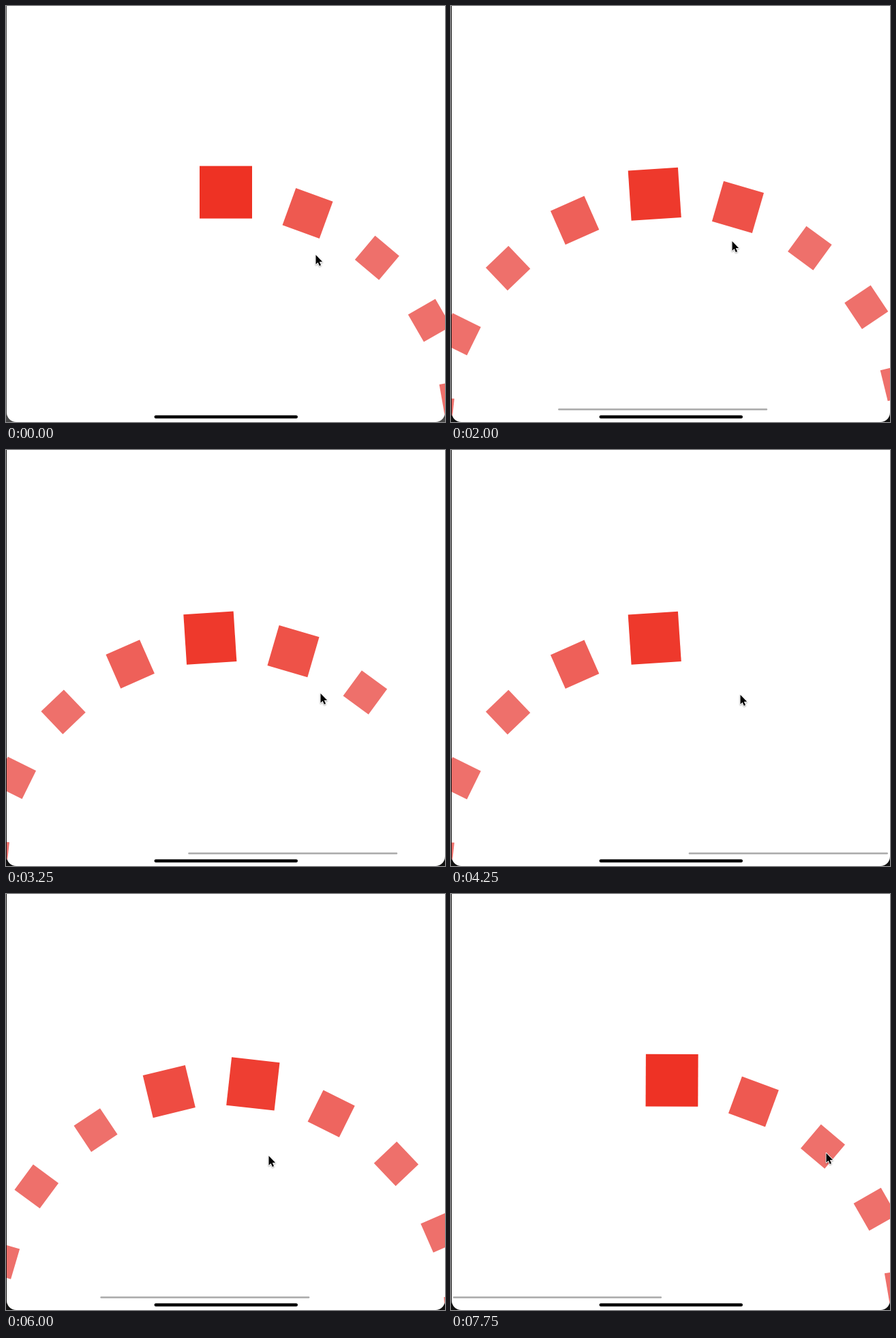
Write an HTML page with a canvas that moves like this. It is 644 px wide and 610 px high and loops after 8 s.

```html
<!DOCTYPE html>
<html>
<head>
<meta charset="utf-8">
<style>
  html, body { margin: 0; width: 100%; height: 100%; overflow: hidden; background: #fff; }
  canvas { display: block; }
</style>
</head>
<body>
<canvas id="stage" width="644" height="610"></canvas>
<script>
const ctx = document.getElementById('stage').getContext('2d');
const LOOP = 8000, STEP = 250;
const COUNT = 10, PITCH = 20, MAX = (COUNT - 1) * PITCH;
const SIZE = 77, RADIUS = 322, CX = 322.5, CY = 633.6;
const PX_PER_DEG = SIZE / PITCH;

// [time, scroll angle in degrees]
const scrollKeys = [[0, 0], [500, 7], [2000, 83.8], [3250, 143.7], [4250, 183.8],
  [5000, 150], [6000, 73.6], [7000, 3], [7250, -4], [7500, -1.6], [7750, -0.25]];
// [time, x, y] of the pointer tip
const pointerKeys = [[0, 454, 365], [2000, 412, 345], [3250, 461, 357], [4250, 424, 359],
  [5000, 403, 389], [6000, 385, 384], [7750, 550, 380]];

// Monotone cubic interpolation of one column of a key list
function sample(keys, t, col) {
  const last = keys.length - 1;
  let i = 0;
  while (i < last - 1 && t >= keys[i + 1][0]) i++;
  const slope = k => (keys[k + 1][col] - keys[k][col]) / (keys[k + 1][0] - keys[k][0]);
  const tangent = k => {
    if (k === 0 || k === last) return 0;
    const a = slope(k - 1), b = slope(k);
    return a * b > 0 ? 2 * a * b / (a + b) : 0;
  };
  const h = keys[i + 1][0] - keys[i][0], u = (t - keys[i][0]) / h, v = 1 - u;
  return keys[i][col] * (1 + 2 * u) * v * v + tangent(i) * h * u * v * v
    + keys[i + 1][col] * u * u * (3 - 2 * u) - tangent(i + 1) * h * u * u * v;
}

function line(x1, x2, y, width, color) {
  ctx.lineCap = 'round';
  ctx.lineWidth = width;
  ctx.strokeStyle = color;
  ctx.beginPath();
  ctx.moveTo(x1 + width / 2, y);
  ctx.lineTo(x2 - width / 2, y);
  ctx.stroke();
}

// Squares stand on the circle and shrink and pale away from the top
function drawSquare(angle) {
  const far = Math.min(1, Math.abs(angle) / 32);
  const size = SIZE * (1 - 0.4 * far);
  ctx.save();
  ctx.translate(CX, CY);
  ctx.rotate(angle * Math.PI / 180);
  ctx.fillStyle = `rgb(238,${50 + 62 * far},${36 + 71 * far})`;
  ctx.fillRect(-size / 2, -RADIUS - size, size, size);
  ctx.restore();
}

function drawIndicator(scroll) {
  const over = Math.max(0, -scroll, scroll - MAX) * PX_PER_DEG;
  const length = 307 - over;
  const start = scroll > MAX ? 641 - length : 3 + Math.max(0, scroll) / MAX * 331;
  line(start, start + length, 591.5, 2.5, '#a9a9a9');
}

function drawPointer(x, y) {
  ctx.save();
  ctx.translate(x + 0.5, y);
  const arrow = new Path2D('M0 0V13.8L3.1 10.9L5.3 16L7.5 15L5.3 10.1H9.6Z');
  ctx.lineJoin = 'round';
  ctx.lineWidth = 1.8;
  ctx.strokeStyle = '#fff';
  ctx.shadowColor = 'rgba(0,0,0,.35)';
  ctx.shadowBlur = 2;
  ctx.shadowOffsetY = 1;
  ctx.stroke(arrow);
  ctx.shadowColor = 'transparent';
  ctx.fillStyle = '#000';
  ctx.fill(arrow);
  ctx.restore();
}

function draw(t) {
  const scroll = sample(scrollKeys, t, 1);
  ctx.fillStyle = t < STEP ? '#484848' : '#111';
  ctx.fillRect(0, 0, 644, 610);

  ctx.save();
  ctx.beginPath();
  ctx.roundRect(1, -40, 643, 650, 14);
  ctx.clip();
  ctx.fillStyle = '#fff';
  ctx.fillRect(0, 0, 644, 610);
  for (let i = 0; i < COUNT; i++) drawSquare(i * PITCH - scroll);
  if (t >= 2 * STEP) drawIndicator(scroll);
  line(217.5, 428, 602.5, 4.5, '#000');
  ctx.restore();

  drawPointer(sample(pointerKeys, t, 1), sample(pointerKeys, t, 2));
}

const begin = performance.now();
function tick() {
  const t = (performance.now() - begin) % LOOP;
  draw(Math.floor(t / STEP) * STEP);
  requestAnimationFrame(tick);
}
tick();
</script>
</body>
</html>
```
